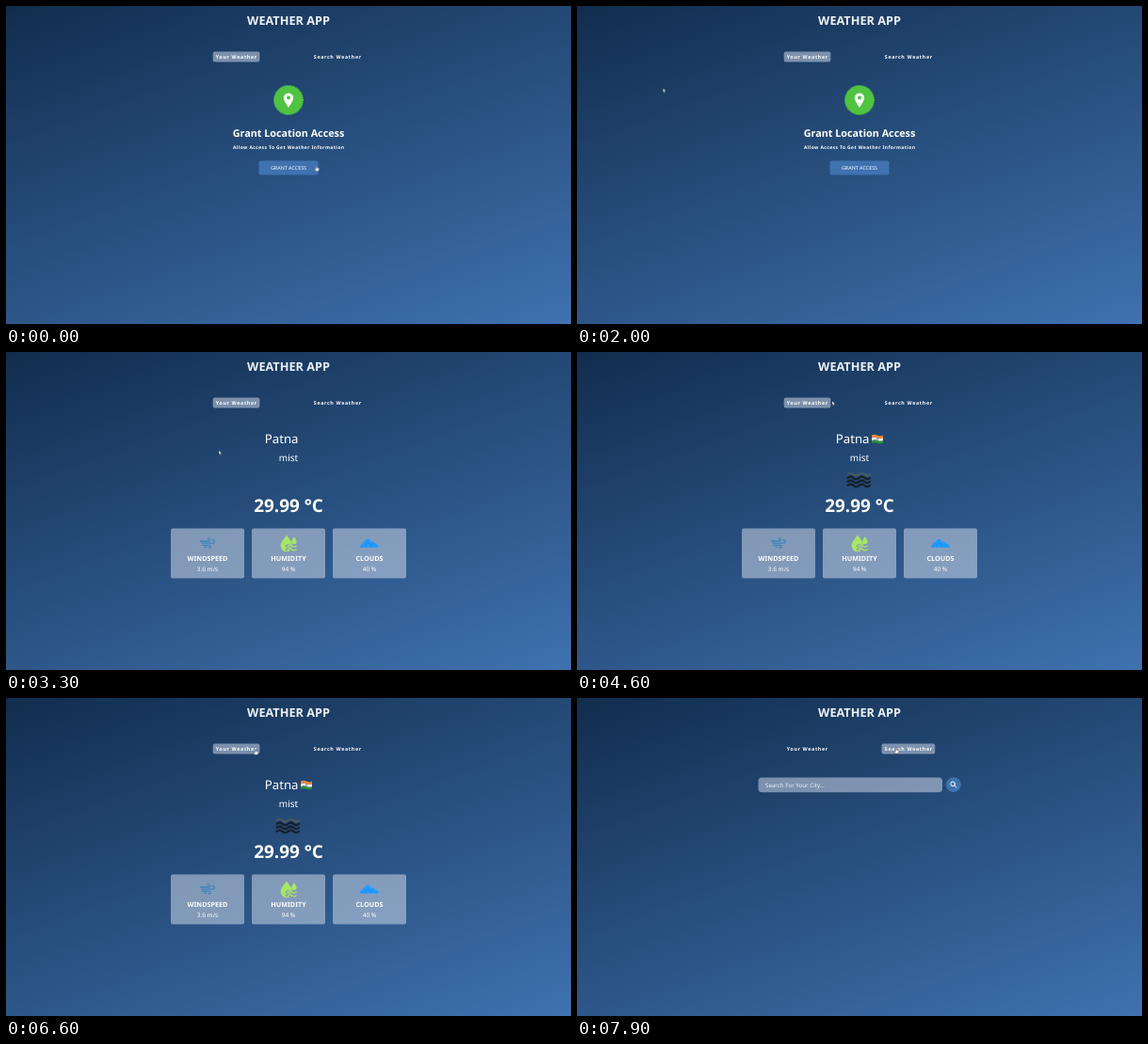
Recreate the animation shown at these times as an HTML page. Size 600 px wide and 338 px high, loop 8 s.

```html
<!DOCTYPE html>
<html lang="en">
<head>
<meta charset="utf-8">
<title>Weather App</title>
<style>
  html, body { margin: 0; width: 100%; height: 100%; overflow: hidden; }
  body { background: linear-gradient(160deg, #112d4e 0%, #3f72af 100%); }
  svg { display: block; width: 100%; height: 100%; }
  text {
    font-family: "Noto Sans", "Open Sans", sans-serif;
    fill: #fff;
    text-anchor: middle;
    text-rendering: geometricPrecision;
  }
  .title { font-size: 12.7px; font-weight: 700; fill: #edf2f9; }
  .tab { font-size: 5.3px; font-weight: 600; letter-spacing: .65px; }
  .head { font-size: 10.8px; font-weight: 600; }
  .note { font-size: 5px; font-weight: 600; letter-spacing: .39px; }
  .button { font-size: 5.4px; font-weight: 500; }
  .city { font-size: 13.2px; font-weight: 300; }
  .sky { font-size: 10px; font-weight: 300; }
  .temp { font-size: 18.9px; font-weight: 700; }
  .label { font-size: 7.2px; font-weight: 600; }
  .value { font-size: 6.5px; font-weight: 300; }
  .hint { font-size: 6.2px; text-anchor: start; fill: #eef2f8; }
  .panel { fill: rgba(219, 226, 239, .5); }
  .blue { fill: #3f72af; }
  .line { fill: none; stroke-linecap: round; }

  .access, .weather, .icons, .search, .arrow, .hand { animation: 8s step-end infinite; }
  .access { animation-name: access; }
  .weather { animation-name: weather; }
  .icons { animation-name: icons; }
  .search { animation-name: search; }
  .arrow { animation-name: arrow; }
  .hand { animation-name: hand; }
  .pointer { animation: travel 8s linear infinite; }

  @keyframes access { 0% { opacity: 1; } 37.5%, 100% { opacity: 0; } }
  @keyframes weather { 0% { opacity: 0; } 37.5% { opacity: 1; } 95%, 100% { opacity: 0; } }
  @keyframes icons { 0% { opacity: 0; } 46.25%, 100% { opacity: 1; } }
  @keyframes search { 0% { opacity: 0; } 95%, 100% { opacity: 1; } }
  @keyframes arrow {
    0% { opacity: 0; } 11.25% { opacity: 1; } 62.5% { opacity: 0; }
    88.75% { opacity: 1; } 91.25%, 100% { opacity: 0; }
  }
  @keyframes hand {
    0% { opacity: 1; } 11.25% { opacity: 0; } 62.5% { opacity: 1; }
    88.75% { opacity: 0; } 91.25%, 100% { opacity: 1; }
  }
  @keyframes travel {
    0%, 10% { transform: translate(329.5px, 169.5px); }
    11.25% { transform: translate(322px, 163px); }
    15% { transform: translate(160px, 91px); }
    22.5% { transform: translate(94px, 88px); }
    30%, 35% { transform: translate(86px, 86px); }
    41.25% { transform: translate(226px, 104.5px); }
    46.25% { transform: translate(232px, 100px); }
    56.25%, 60% { transform: translate(271px, 52px); }
    65%, 87.5% { transform: translate(264.8px, 54.3px); }
    92.5%, 100% { transform: translate(338.8px, 53px); }
  }
</style>
</head>
<body>
<svg viewBox="0 0 600 338">
  <defs>
    <path id="wave" class="line" d="M287.5 0q3-2.6 6 0t6 0t6 0t5.5 0"/>
    <rect id="card" class="panel" y="187.5" width="78" height="53" rx="2"/>
  </defs>

  <text class="title" x="300" y="20">WEATHER APP</text>

  <g class="access">
    <circle cx="300" cy="100" r="15.2" fill="#50c341"/>
    <circle cx="300" cy="100" r="15.4" fill="none" stroke="#50c341" stroke-width="1.2" stroke-dasharray="1 .7"/>
    <path fill="#fff" d="M300 108.2C298.6 105.2 294.8 101 294.8 97.6A5.2 5.2 0 0 1 305.2 97.6C305.2 101 301.4 105.2 300 108.2Z"/>
    <circle cx="300" cy="97.5" r="2" fill="#50c341"/>
    <text class="head" x="300" y="139">Grant Location Access</text>
    <text class="note" x="300.2" y="152">Allow Access To Get Weather Information</text>
    <rect class="blue" x="268.5" y="164.5" width="63" height="15" rx="2"/>
    <text class="button" x="300" y="173.8">GRANT ACCESS</text>
  </g>

  <g class="weather">
    <text class="city" x="292.6" y="96.6">Patna</text>
    <text class="sky" x="300" y="116">mist</text>
    <text class="temp" x="300" y="170.3">29.99 °C</text>

    <use href="#card" x="175"/>
    <g class="line" stroke="#3a86bd" stroke-width="1.3">
      <path d="M206.5 201h7.5q2.4 0 2.2-1.6t-2.2-1"/>
      <path d="M208 203.2h10.5q3 0 2.8-2t-2.6-1.3"/>
      <path d="M208.5 205.3h7q2 .2 1.6 1.7t-2 .8M211 207.4h1.5"/>
    </g>
    <text class="label" x="214" y="222.3">WINDSPEED</text>
    <text class="value" x="214" y="232.6">3.6 m/s</text>

    <use href="#card" x="261"/>
    <g fill="#a8e667">
      <path d="M298 194.5C300 198 304.2 201.5 304.2 206A6.3 6.3 0 0 1 291.6 206C291.6 201.5 296 198 298 194.5Z"/>
      <path d="M305.8 196C306.6 198 308.6 199.6 308.6 201.6A2.7 2.7 0 0 1 303.2 201.6C303.2 199.6 305 198 305.8 196Z"/>
    </g>
    <g class="line" stroke="#8799b6" stroke-width="2.6">
      <path d="M298 206.2q2.5-1.8 5 0t5 0M298 210q2.5-1.8 5 0t5 0"/>
    </g>
    <g class="line" stroke="#a8e667" stroke-width="1.4">
      <path d="M299 206.2q2.3-1.8 4.6 0t4.6 0M299 210q2.3-1.8 4.6 0t4.6 0"/>
    </g>
    <text class="label" x="300" y="222.3">HUMIDITY</text>
    <text class="value" x="300" y="232.6">94 %</text>

    <use href="#card" x="347"/>
    <path fill="#1e9bff" d="M376 207.7Q375.6 204.6 378.6 204Q378.4 201.2 381 201.4Q382.4 197.8 385.4 199Q387.4 199.8 387.8 202.2Q390.4 200.6 391.6 203.4Q395.6 203.6 396 207.7Z"/>
    <path class="line" stroke="#2f7fd2" stroke-width=".7" d="M382 206q.2-3 3-2.7t3 2.7"/>
    <text class="label" x="386" y="222.3">CLOUDS</text>
    <text class="value" x="386" y="232.6">40 %</text>

    <g class="icons">
      <path fill="#f08a3c" d="M313 88.6q3-1.5 6 0t6-.2v3q-3 1.3-6 0t-6 0Z"/>
      <path fill="#f4f4f4" d="M313 91.4q3-1.3 6 0t6 0v2.8q-3 1.3-6 0t-6 0Z"/>
      <path fill="#2f8f3d" d="M313 94.2q3-1.3 6 0t6 0v2.6q-3 1.3-6 0t-6 0Z"/>
      <circle cx="319" cy="92.8" r="1" fill="none" stroke="#3a4a9a" stroke-width=".5"/>
      <use href="#wave" y="130" stroke="#4d5b61" stroke-width="2"/>
      <g stroke="#17212c" stroke-width="2.2">
        <use href="#wave" y="133.8"/>
        <use href="#wave" y="137.8"/>
        <use href="#wave" y="141.8"/>
      </g>
    </g>
  </g>

  <g class="search">
    <rect class="panel" x="323.5" y="48.5" width="56.7" height="11" rx="2"/>
    <rect class="panel" x="192.5" y="84.5" width="195.5" height="15.7" rx="4"/>
    <text class="hint" x="200" y="94.8">Search For Your City...</text>
    <circle class="blue" cx="399.8" cy="92.2" r="8"/>
    <g class="line" stroke="#fff" stroke-width="1">
      <circle cx="399.1" cy="91.3" r="2.3"/>
      <path d="M400.9 93.1l2 2"/>
    </g>
  </g>

  <g class="access">
    <rect class="panel" x="219.7" y="48.5" width="49.7" height="11" rx="2"/>
  </g>
  <g class="weather">
    <rect class="panel" x="219.7" y="48.5" width="49.7" height="11" rx="2"/>
  </g>
  <text class="tab" x="244.8" y="56">Your Weather</text>
  <text class="tab" x="352.3" y="56">Search Weather</text>

  <g class="pointer" fill="#fff" stroke="#1a2430" stroke-width=".4" stroke-linejoin="round">
    <path class="arrow" d="M0 0V4.4L1 3.5L1.8 5.2L2.5 4.9L1.8 3.2H3.1Z"/>
    <path class="hand" d="M-.5 .4Q0-.3.5.4V2.2L2.6 2.8Q3.2 3 3 3.8L2.5 6H-.6L-2 3.9Q-1.8 3-.5 3.8Z"/>
  </g>
</svg>
</body>
</html>
```
